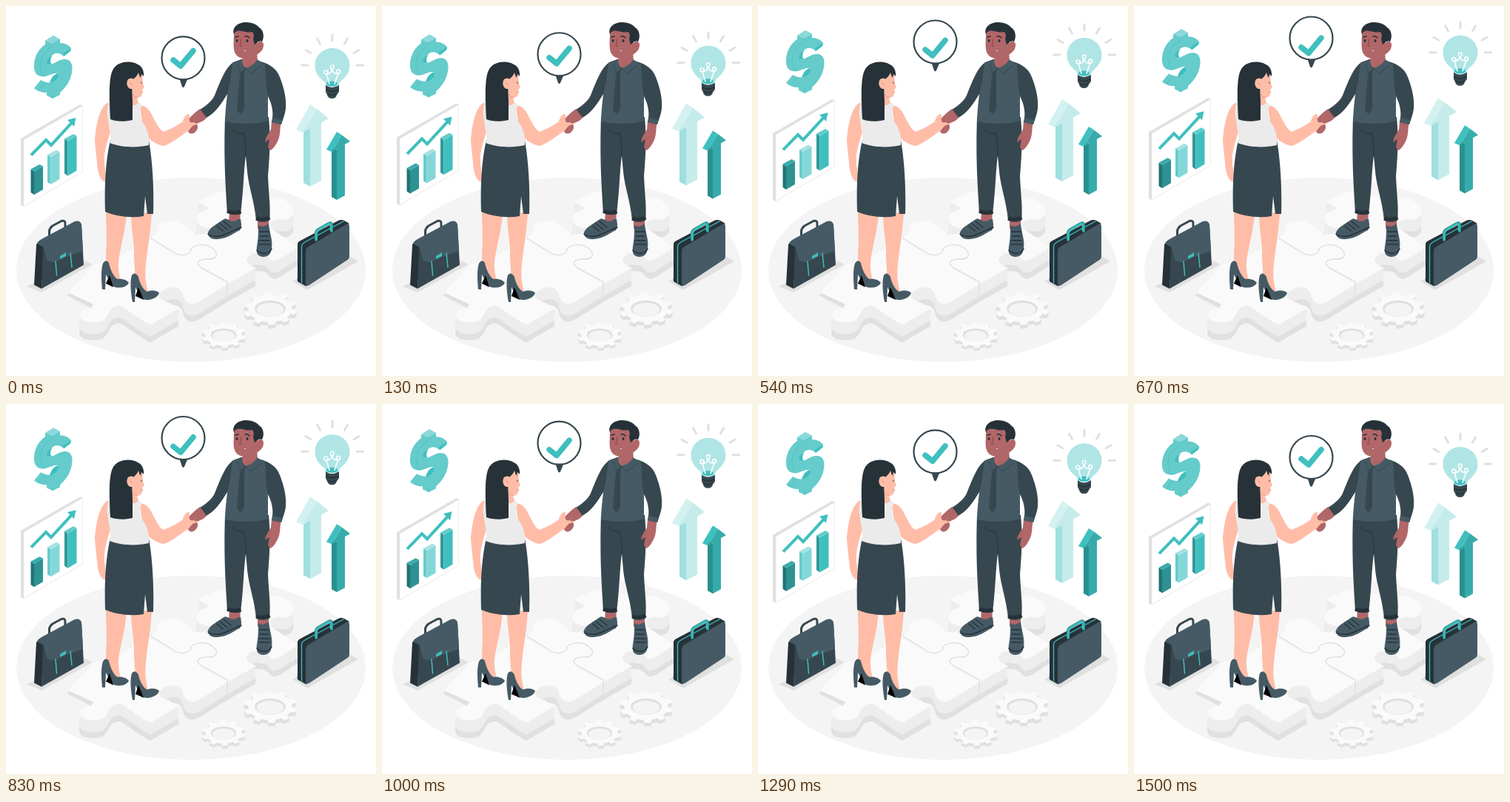
An HTML page that plays this animation: 500x500 px, repeating every 1540 ms.

```html
<!DOCTYPE html>
<html lang="en">
<head>
<meta charset="utf-8">
<title>Business deal</title>
<style>
html, body { margin: 0; width: 100%; height: 100%; overflow: hidden; background: #fff; }
svg { display: block; width: 100%; height: 100%; }
.ink { fill: #263238; }
.navy { fill: #37474f; }
.slate { fill: #455a64; }
.teal { fill: #3fbfbf; }
.skin { fill: #ffbda7; }
.brown { fill: #b16668; }
.line { fill: none; stroke-linecap: round; stroke-linejoin: round; }
.flat { fill: none; stroke-linejoin: miter; }
</style>
</head>
<body>
<svg viewBox="0 0 500 500" xmlns="http://www.w3.org/2000/svg">
<defs>
  <path id="puzzle" d="M84 388 L118 403 C113 408 100 407 99 417 C99 426 112 429 126 427 C141 424 136 406 152 405 C160 405 165 414 195 431 L234 408 L210 396 C202 389 214 380 228 380 C243 383 236 396 246 401 C252 404 256 402 262 399 L299 376 L338 354 C330 350 322 347 327 339 C335 330 352 334 356 341 C361 347 366 344 372 341 L395 326 L360 302 C354 294 360 288 368 288 C382 291 390 285 388 274 C384 262 362 256 348 260 C338 264 340 258 325 256 L287 251 L259 264 L276 274 C266 276 257 280 257 288 C258 298 272 302 284 299 L285 306 L256 309 L240 296 C228 287 207 289 204 299 C205 307 200 310 195 314 L160 335 L118 350 Z"/>
</defs>

<ellipse cx="250" cy="356.500" rx="236" ry="124.500" fill="#f4f4f4"/>
<g id="slab"></g>
<!-- floor beside the left notch -->
<path fill="#f4f4f4" d="M78 389 L116 407 C108 409 99 411 99 419 L98 440 L70 420Z"/>
<path fill="#e0e0e0" d="M82 391 L86 388 L118 403 L115 408Z"/>
<path class="line" stroke="#e0e0e0" stroke-width="1.500" d="M196 314 L225 332 C238 341 249 335 250 329 C253 322 270 320 280 328 C290 338 282 343 270 342 C254 344 258 351 268 356 L299 373 V390"/>
<g id="gears"></g>

<!-- satchel -->
<path d="M28 379 L48 387 L117 349 L104 343Z" fill="#e0e0e0"/>
<path class="line" stroke="#37474f" stroke-width="3" d="M58.500 312 V304 Q59 300 63 297 L75 290.500 Q80 289 80 294 V301"/>
<path class="ink" d="M41 322 L46 317 L52 325 L48 382 L38 377Z"/>
<path class="navy" d="M50 325 L102 296 L105 350 L48 382Z"/>
<path class="slate" d="M42 321 Q44 317 48 315 L93 291 Q100 289 102 295 L104 330 C96 336 83 337 76 341 C68 346 60 348 55 343 L51 326Z"/>
<path class="line" stroke="#3fbfbf" stroke-width="1.500" d="M67 345 L68.500 364 M87 334 L89 353"/>
<path class="teal" d="M73 338 L81 333 V338 L73 342Z"/>

<!-- briefcase -->
<path d="M387 372 L407 384 L476 345 L464 338Z" fill="#e0e0e0"/>
<path class="ink" d="M394 322 Q394 319 398 317 L449 290 Q453 288 457 290 L464 294 L406 328 V379 L395 373 Q393 372 394 366Z"/>
<path class="slate" d="M405 331 Q405 327 409 325 L460 295 Q464 293 464 298 V338 Q464 342 460 344 L410 377 Q405 380 405 375Z"/>
<path class="line" stroke="#3fbfbf" stroke-width="1.300" d="M399.500 374 V326 Q399 322 404 319 L456 291"/>
<path class="line" stroke="#2f9999" stroke-width="4" d="M419 316 V307 Q419 304 422 302 L436 294 Q440 292 440 296 V304"/>
<path class="line" stroke="#3fbfbf" stroke-width="2.500" d="M419.500 315 V307 Q420 304 423 302 L436 294.500 Q439 293 439 297 V303"/>

<!-- man -->
<path class="brown" d="M302 278 L317 279 L316 292 L301 292Z M340 288 L355 288 V301 L340 301Z"/>
<path class="slate" d="M273 306 C275 299 288 293 293 289 C298 285 301 290 306 291 C311 291 315 287 317 288 C318 294 319 299 316 303 C307 307 300 314 287 315 C278 316 272 312 273 306Z"/>
<path class="line" stroke="#263238" stroke-width="1.500" d="M273 308 C280 313 290 312 300 307 S312 302 318 299 M289 294 L299 302 M294 291 L304 299 M285 297 L293 304"/>
<path class="slate" d="M341 296 C345 299 351 298 355 294 C356 306 361 317 359 328 C358 337 352 339 347 339 C339 338 338 333 339 325 C341 315 341 305 341 296Z"/>
<path class="line" stroke="#263238" stroke-width="1.500" d="M339 330 C344 336 355 336 359 328 M343 305 H355 M343 311 H355 M342 317 H356 M342 322 H356"/>
<path class="navy" d="M296 150 H355 C358 180 356 205 354 230 C355 255 358 272 356 290 Q347 294 338 290 C336 265 328 245 326 224 L324 202 C321 225 321 250 317 281 Q308 284 299 280 C297 245 294 210 296 150Z"/>
<path class="flat" stroke="#263238" stroke-width="5" d="M299 277 Q308 281 317.500 278 M338 287 Q347 290 356.500 286"/>
<path class="line" stroke="#263238" d="M324 203 Q325 187 321 173 M306 167 Q313 174 322 172"/>
<path class="brown" d="M359 155 L372 157 C370 164 371 170 369 178 C366 186 362 193 357 195 L354 191 L356 180 L350 184 C351 177 355 172 358 167Z"/>
<path class="navy" d="M318 72 L341 74 C352 77 365 82 370 96 C376 112 379 124 378 139 C377 147 374 153 372 160 L359 157 C362 145 360 134 354 122 L299 119 C291 132 283 145 269 152 L262 140 C273 133 280 127 283 118 C290 101 296 84 307 76Z"/>
<path class="slate" d="M314 74 L342 74 L350 79 C351 94 351 108 354 122 V155 C337 160 313 160 296 156 C296 143 298 130 299 119 C303 106 304 90 306 77Z M360 151 L374 154 L372 160 L359 157Z"/>
<path class="brown" d="M320 65 L339 60 L340 75 Q333 84 322 85 L319 75Z"/>
<path class="navy" d="M318 80 L324 83 L322 91 L322 139 L317 147 L312 140 L316 93Z"/>
<path class="slate" d="M316 74 L323 84 L317 90 L312 77Z M340 72 L346 80 L331 91 L323 84 C331 82 337 77 340 72Z"/>
<path class="line" stroke="#37474f" d="M323 84 L331 91 L346 80 M317 90 L312 78"/>
<path class="brown" d="M308 36 C308 48 306 60 311 66 C316 72 327 72 334 68 C342 65 348 60 348 53 C348 46 342 47 340 50 L336 32 L318 30Z"/>
<path class="ink" d="M308 38 C305 30 312 22 325 22 C334 22 340 26 342 29 C349 33 349 43 346 48 C341 46 338 51 336 52 L334 45 Q336 39 333 35 C325 37 318 32 312 34 Q309 35 308 38Z"/>
<path class="ink" d="M310.500 47 a1.500 2 0 1 0 3 0 a1.500 2 0 1 0 -3 0 M324.500 47 a1.500 2 0 1 0 3 0 a1.500 2 0 1 0 -3 0"/>
<path class="line" stroke="#263238" stroke-width="1.600" d="M310 42 L314 41 M323 41 Q326 40 329 43"/>
<path class="line" stroke="#8c454c" stroke-width="1.100" d="M318 45 L316 54 L319 54"/>
<path d="M321 60 Q323 58 324.500 60 Q324 62 321.500 61.500Z" fill="#fff" stroke="#8c454c" stroke-width=".8"/>

<!-- woman -->
<path class="skin" d="M138 130 C125 138 122 162 120 181 C121 196 123 210 124 222 C126 231 130 238 134 237 C136 230 134 222 133 213 C132 200 135 190 138 180 L145 158Z"/>
<path class="skin" d="M135 278 L163 280 C161 308 154 326 152 346 C151 358 155 367 154 373 L140 370 C135 354 134 340 136 322Z M169 282 L197 278 C196 305 191 326 189 350 C187 368 190 378 192 387 L181 386 C174 374 174 355 173 340 C174 319 169 302 169 282Z"/>
<path class="slate" d="M131 348 C133 344 136 343 139 347 C141 357 146 367 151 369 C158 368 164 371 166 374 C163 381 151 382 145 379 C140 373 137 366 135 363 L134 383 H130 C129 371 128 357 131 348Z"/>
<path class="slate" d="M170 364 C173 360 176 361 179 366 C181 376 186 384 191 386 C198 383 205 385 207 388 C204 396 191 399 185 396 C180 391 177 384 175 380 L174 400 H171 C169 389 167 373 170 364Z"/>
<path d="M140 364 L145 380 L135 375Z M179 380 L186 397 L175 392Z" fill="#000"/>
<path class="navy" d="M141 181 H193 C198 210 200 245 199 281 L191 281 L188 257 L186 284 C168 287 148 284 134 278 C133 245 134 211 141 181Z"/>
<path class="skin" d="M181 137 C186 131 194 140 198 149 C204 160 208 168 213 170 C223 166 233 161 239 156 C240 151 243 147 246 146 L248 152 L258 151 L264 156 L257 161 L247 168 C234 177 221 188 212 189 C202 187 192 179 186 172Z"/>
<path fill="#ebebeb" d="M139 132 C149 129 171 127 184 133 C179 141 181 153 186 159 C191 166 194 177 193 188 C177 192 154 191 140 185 C143 176 139 165 138 154 C136 145 136 138 139 132Z"/>
<path class="skin" d="M166 94 L178 86 L184 90 C185 97 184 103 187 110 L184 113 C185 120 183 124 177 124 L179 131 Q175 136 169 133Z"/>
<path class="line" stroke="#e9947d" d="M185 116 L182 116.500 M171 120 Q174 123 178 124"/>
<path class="ink" d="M141 153 C140 132 138 99 144 87 C151 73 171 74 178 79 C184 81 187 89 186 95 L183 92 L182 97 Q180 95 179 90 C177 95 174 97 172 99 C169 108 171 119 171 130 L171 154 C159 157 148 156 141 153Z"/>
<path class="skin" d="M165 99 C162 103 163 110 168 112 L173 112 V99 Q169 96 165 99Z"/>
<path class="line" stroke="#e9947d" d="M167 103 Q169 103 170 107"/>
<path class="line" stroke="#263238" d="M183 103 V104.500"/>
<path class="brown" d="M262 139 L271 151 C266 157 261 157 257 159 C260 162 260 166 256 170 C252 174 247 173 246 169 L251 163 L255 156 C251 159 246 160 243 158 C248 150 255 144 262 139Z"/>
<path class="skin" d="M241 154 C242 149 245 146 248 146 C248 151 247 154 249 157 L260 159 L252 162 L247 168 L240 165Z"/>

<!-- floating signs -->
<g data-rise="10">
  <path fill="#65cbcb" d="M53 47 L64 40 L73 45 V50 C80 50 85 53 88 57 L87 61 L78 68 C74 64 68 62 63 66 C57 70 54 76 57 79 C62 81 69 73 78 72 C86 71 90 77 89.500 85 C89 98 82 109 73 117 V120 L63 125 L55 121 V117 C48 117 43 115 38 111 L47 100 C53 104 61 105 67 101 C71 98 73 93 70 91 C64 89 55 97 47 95 C40 94 37 87 38 78 C39 67 45 57 53 52Z"/>
  <path fill="#8cd9d9" d="M53 47 L64 40 L73 45 L62 51Z"/>
  <path fill="#3fbfbf" d="M78 68 L87 61 L88 57 L77 64Z M59 104 C61 97 65 92 70 91 C73 93 71 98 67 101 Q63 104 59 104Z M57 79 C53 77 56 70 63 66 C60 71 59 76 62 79Z"/>
  <path class="flat" stroke="#50c5c5" d="M62 51 V55 C52 61 46 70 46 81 Q46 89 51 95 M63 125 V118 M44 114 L53 103"/>
</g>

<g data-rise="10">
  <path fill="#e0e0e0" d="M20 179 L100 133 L104 134.500 V224 L24 271 L20 269Z"/>
  <path fill="#fff" stroke="#ebebeb" stroke-width=".8" d="M24 181 L103.500 135 V224 L24 270.500Z"/>
  <path class="flat" stroke="#3fbfbf" stroke-width="4" d="M34 201.500 L54 181 L61 188 L89.500 157"/>
  <path class="teal" d="M83 154 L94.500 151 L92 163Z"/>
  <g id="bars"></g>
</g>

<g data-rise="10">
  <path fill="#a0dfdf" d="M402 160 L411 164 V244 L402 239Z"/>
  <path fill="#c5ebeb" d="M411 158 L426 150 V236 L411 244Z"/>
  <path fill="#d4f1f1" d="M392 167 L411 133 L420 139 L401 171Z"/>
  <path fill="#c5ebeb" d="M420 139 L436 152 L401 171Z"/>
  <path fill="#2a8f8f" d="M440 190 L447 194 V262 L440 258Z"/>
  <path fill="#37abab" d="M447 190 L458 184 V256 L447 262Z"/>
  <path fill="#3fbfbf" d="M433 194 L447 170 L454 174.500 L440 197Z"/>
  <path fill="#37abab" d="M454 174.500 L465 183 L440 197Z"/>
</g>

<g data-rise="20">
  <path class="line" stroke="#e0e0e0" stroke-width="3" d="M441 39 V47 M399.500 80 H408 M474 80 H482.500 M420.500 44 L424.500 51 M461.500 44 L457.500 51 M405 59.500 L412 63.500 M477 59.500 L470 63.500"/>
  <path fill="#b0e5e5" d="M441 57 C454 57 464.500 67 464.500 80.500 C464.500 92 456 98 451 103 L449 109 H432 L431 103 C425 98 417.500 92 417.500 80.500 C417.500 67 428 57 441 57Z"/>
  <path class="navy" d="M432 107 Q440 113 450 107 V116 L447 120 Q446 125 440.500 125 Q435 125 434 120 L432 116Z"/>
  <path class="line" stroke="#263238" stroke-width="1.500" d="M433 113 Q441 118 449 113 M435 119 Q441 122 446 119"/>
  <ellipse class="teal" cx="440.500" cy="105" rx="7.500" ry="3.500"/>
  <path class="line" stroke="#fff" stroke-width="1.600" d="M437 105 L433 92 C429 92 429 87 432 87 C436 87 436 91 433 92 C438 92 440 89 440 86 C437 82 439 80 441 80 C444 80 444 83 441 86 C441 90 445 92 449 91 C446 90 446 86 449 86 C453 87 452 91 449 91 L444 105"/>
</g>

<g data-rise="31">
  <path class="navy" d="M234 97 H246 L241 109 Q239.500 111 238 109Z"/>
  <circle cx="239.500" cy="70.300" r="29" fill="#fff" stroke="#37474f" stroke-width="2.200"/>
</g>
<path data-rise="20" class="line" stroke="#3fbfbf" stroke-width="7.500" d="M226 73 L236 81 L253 60.500"/>
</svg>
<script>
const $ = id => document.getElementById(id);
const path = (fill, d) => `<path fill="${fill}" d="${d}"/>`;

// Puzzle thickness and its shadow
const layer = (y, fill) => `<use href="#puzzle" y="${y}" fill="${fill}"/>`;
let slab = '';
for (let y = 24; y > 0; y -= 2) slab += layer(y, y > 17 ? '#e0e0e0' : '#ededed');
$('slab').innerHTML = slab + layer(0, '#fafafa');

// Isometric gear with a rim, extruded downwards
function gear(cx, cy, rx, ry, teeth, depth) {
  const ring = y => {
    const pts = [];
    for (let i = 0; i < teeth; i++) {
      [[-.27, .83], [-.2, 1], [.2, 1], [.27, .83]].forEach(([o, r]) => {
        const a = (i + .4 + o) * 2 * Math.PI / teeth;
        pts.push((cx + rx * r * Math.cos(a)).toFixed(1) + ' ' + (cy + y + ry * r * Math.sin(a)).toFixed(1));
      });
    }
    return 'M' + pts.join('L') + 'Z';
  };
  const hole = (k, y, fill) =>
    `<ellipse cx="${cx}" cy="${cy + y}" rx="${rx * .58 * k}" ry="${ry * .5 * k}" fill="${fill}"/>`;
  let out = '';
  for (let y = depth; y > 0; y--) out += path('#e0e0e0', ring(y));
  return out + path('#fafafa', ring(0)) + hole(1, 0, '#e0e0e0') + hole(.86, 1.4, '#f4f4f4');
}
$('gears').innerHTML = gear(357, 409, 36, 22, 10, 5) + gear(294, 444.5, 30, 17.5, 10, 4);

// Chart columns: left side, front and lid
function bar(x, top, base, side, front, lid) {
  return path(side, `M${x} ${top + 6}L${x + 4.5} ${top + 9}V${base}L${x} ${base - 3}Z`) +
    path(front, `M${x + 4.5} ${top + 9}L${x + 16.5} ${top + 2}V${base - 7}L${x + 4.5} ${base}Z`) +
    path(lid, `M${x} ${top + 6}L${x + 12} ${top - .5}L${x + 16.5} ${top + 2}L${x + 4.5} ${top + 9}Z`);
}
$('bars').innerHTML =
  bar(33.5, 214.5, 255, '#237474', '#2f9292', '#37abab') +
  bar(56, 195, 241, '#65cbcb', '#85d7d7', '#a5e2e2') +
  bar(79, 173.5, 229.5, '#2f9999', '#3fbfbf', '#65cbcb');

// Everything afloat shares one linear up and down wave, stepped at 24 fps
const FRAMES = 37, LOOP = 1540, LEAD = 1.25;
const wave = n => 1 - Math.abs(((n + LEAD) % FRAMES) * 2 / FRAMES - 1);
const floats = [...document.querySelectorAll('[data-rise]')];
const start = performance.now();

function draw(now) {
  const t = Math.max(0, now - start) % LOOP;
  const n = Math.floor((t + 5) * 24 / 1000);
  const lift = wave(n) - wave(0);
  for (const g of floats) {
    g.setAttribute('transform', `translate(0 ${(-g.dataset.rise * lift).toFixed(2)})`);
  }
}
function tick(now) {
  draw(now);
  requestAnimationFrame(tick);
}
draw(start);
requestAnimationFrame(tick);
</script>
</body>
</html>
```
